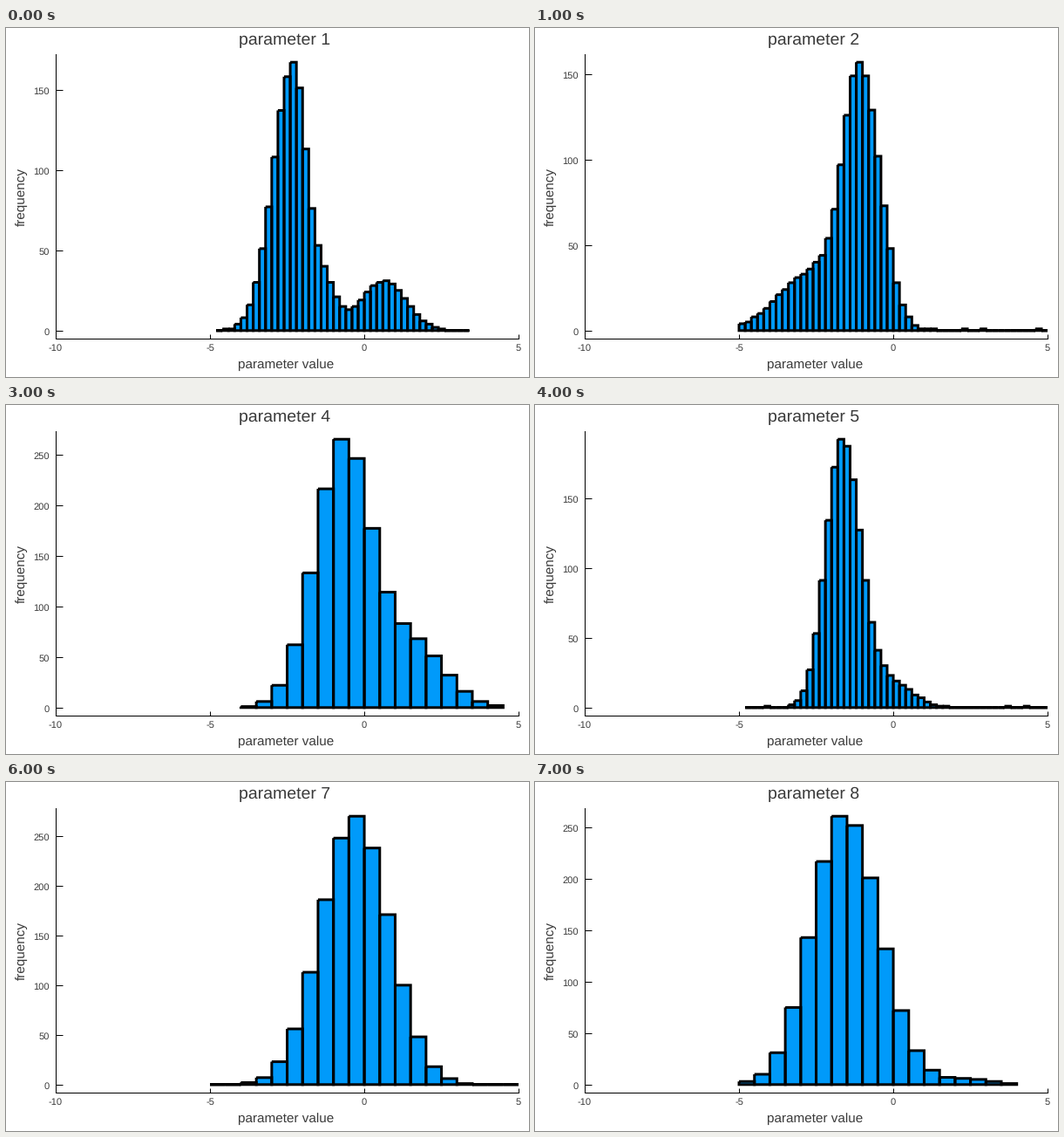
A matplotlib script for the animation above (8 s loop, 600x400 px).

```python
import matplotlib.pyplot as plt
import numpy as np
from matplotlib.animation import FuncAnimation
from matplotlib.collections import LineCollection
from matplotlib.transforms import Affine2D

W, H, DPI = 600, 400, 100
LEFT, RIGHT, TOP, BOTTOM = 57.0, 588.1, 30.0, 356.0
PT = 72 / DPI  # points per pixel
BLUE, INK = "#009afa", "#3a3a3a"
STRAY_RATE = 0.2  # chance of a lone sample in an otherwise empty bin

plt.rcParams["font.family"] = "Liberation Sans"
plt.rcParams["text.hinting"] = "none"

# Each histogram: first edge, last edge, bin width,
# then its bumps as (height, mode, left spread, right spread).
HISTS = [
    (-4.8, 3.4, 0.2, [(165, -2.3, 0.65, 0.4), (32, -1.35, 0.4, 0.4),
                      (31, 0.65, 0.75, 0.7)]),
    (-5.0, 5.0, 0.2, [(155.5, -1.1, 0.55, 0.65), (34, -2.6, 1.1, 0.6)]),
    (-4.0, 4.6, 0.2, [(170, -0.9, 0.7, 0.75)]),
    (-4.0, 4.5, 0.5, [(264.4, -0.65, 0.94, 0.88), (62, 1.6, 0.9, 1.0)]),
    (-4.8, 5.0, 0.2, [(192.3, -1.65, 0.53, 0.58), (18, -0.1, 0.6, 0.7)]),
    (-5.0, 5.0, 0.5, [(326, 1.4, 0.8, 0.88), (24, -0.6, 1.2, 0.8)]),
    (-5.0, 5.0, 0.5, [(270, -0.3, 1.1, 1.1)]),
    (-5.0, 4.0, 0.5, [(263.7, -1.6, 1.04, 1.15), (5, 2.5, 0.8, 0.8)]),
]

fig = plt.figure(figsize=(W / DPI, H / DPI), dpi=DPI, facecolor="white")
ax = fig.add_axes([LEFT / W, 1 - BOTTOM / H, (RIGHT - LEFT) / W, (BOTTOM - TOP) / H])


def label(x, y, text, size, **kw):
    return fig.text(x / W, 1 - y / H, text, fontsize=size, color=INK,
                    ha="center", va="baseline", **kw)


title = label(320, 19, "", 14)
label(321.5, 390.3, "parameter value", 11)
label(21.7, 193.3, "frequency", 11, rotation=90, rotation_mode="anchor")


def bump(x, height, mode, left, right):
    """Bell curve with its own spread on each side of the mode."""
    spread = np.where(x < mode, left, right)
    return height * np.exp(-((x - mode) / spread) ** 2 / 2)


def histogram(i):
    start, stop, width, bumps = HISTS[i]
    lefts = start + width * np.arange(round((stop - start) / width))
    counts = np.rint(sum(bump(lefts + width / 2, *b) for b in bumps))
    strays = np.random.default_rng(i).random(len(lefts)) < STRAY_RATE
    return lefts, width, np.where(counts == 0, strays, counts)


def style_axes(peak):
    ax.set_xlim(-10, 5)
    ax.set_ylim(-0.03 * peak, 1.03 * peak)
    ax.spines[["top", "right"]].set_visible(False)
    ax.spines[["left", "bottom"]].set_linewidth(PT)
    ax.set_xticks([-10, -5, 0, 5], ["-10", "-5", "0", "5"])
    step = 50 if peak < 300 else 100
    ax.set_yticks(np.arange(0, 1.03 * peak, step))
    ax.tick_params(direction="in", width=PT, labelsize=8, labelcolor=INK)
    ax.tick_params(axis="x", length=5 * PT, pad=6 * PT)
    ax.tick_params(axis="y", length=8 * PT, pad=7 * PT)
    nudge = Affine2D().translate(0, -1)
    for text in ax.get_yticklabels():
        text.set_transform(text.get_transform() + nudge)


def draw(i):
    lefts, width, counts = histogram(i)
    ax.clear()
    ax.bar(lefts, counts, width, align="edge", color=BLUE, linewidth=0, snap=False)
    # Open outlines leave the top left corner unjoined; empty bins become baseline.
    outlines = [[(x, n), (x + width, n), (x + width, 0), (x, 0), (x, n)]
                for x, n in zip(lefts, counts)]
    ax.add_collection(LineCollection(outlines, colors="black", linewidths=3 * PT,
                                     capstyle="butt", joinstyle="miter", snap=False))
    style_axes(counts.max())
    title.set_text(f"parameter {i + 1}")


anim = FuncAnimation(fig, draw, frames=len(HISTS), interval=1000, repeat=True,
                     repeat_delay=0, init_func=lambda: None)
plt.show()
```
